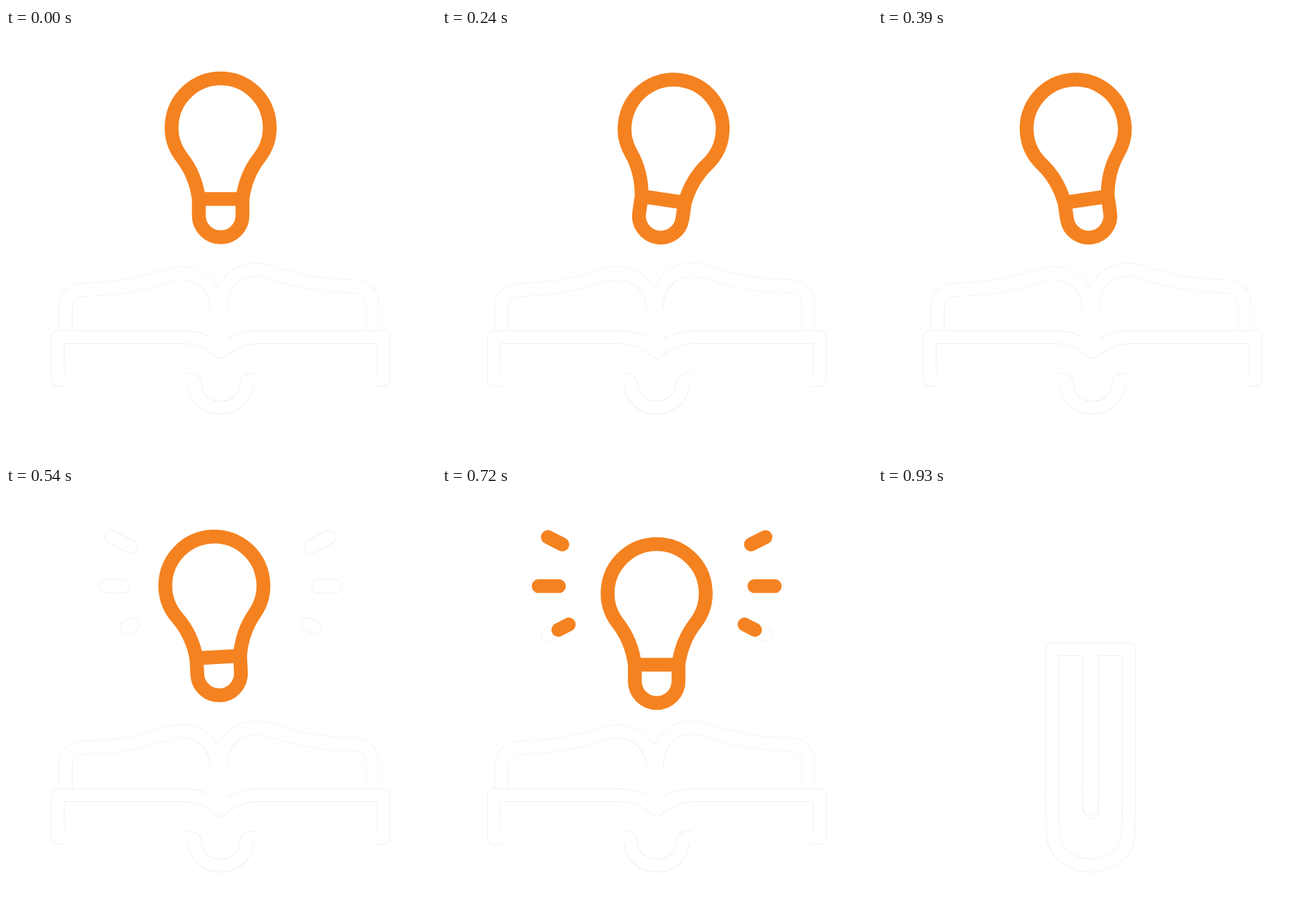
These frames come from a looping animation (640 by 640 pixels, 1200 ms). An HTML page with a canvas:

```html
<!DOCTYPE html>
<html lang="en">
<head>
<meta charset="utf-8">
<title>Idea book</title>
<style>
html, body { margin: 0; width: 100%; height: 100%; overflow: hidden; background: #fff; }
canvas { display: block; }
</style>
</head>
<body>
<canvas id="c" width="640" height="640"></canvas>
<script>
const ctx = document.getElementById('c').getContext('2d');
const ORANGE = '#f58220', EDGE = '#e2e2e2', WHITE = '#fff', MID = 319.5;
const LOOP = 1200, STEP = 30, CLOSED = 930;

const lin = (t, a, b) => Math.min(1, Math.max(0, (t - a) / (b - a)));
const ease = (t, a, b) => { const u = lin(t, a, b); return u * u * (3 - 2 * u); };
const mix = (a, b, u) => a + (b - a) * u;

function stroke(path, color, width) {
  ctx.strokeStyle = color;
  ctx.lineWidth = width;
  ctx.stroke(path);
}

const bulb = new Path2D(
  'M287 254.5C284 232 276 211 262 193A73 73 0 1 1 377 193' +
  'C363 211 355 232 352 254.5V279A32.5 32.5 0 0 1 287 279ZH352');

function drawBulb(t) {
  const swing = t < 210 ? ease(t, 0, 210)
    : t < 420 ? 1 - 2 * ease(t, 210, 420)
    : ease(t, 420, 615) - 1;
  const fall = 11.5 * (Math.max(0, t - 608) / 112) ** 3;
  ctx.save();
  ctx.translate(MID, 321 + fall);
  ctx.rotate(swing * 9.45 * Math.PI / 180);
  ctx.translate(-MID, -321);
  stroke(bulb, ORANGE, 20.6);
  ctx.restore();
}

// Three rays per side, top to bottom: each grows white, fills orange, then shrinks outwards
function drawRays(t) {
  for (let i = -1; i <= 1; i++) {
    const s = t - 45 * (i + 1);
    const pale = ease(s, 400, 540), head = ease(s, 560, 700), tail = lin(s, 695, 810);
    const tilt = 0.47 * i, length = 33 + 2 * i;
    for (const side of [-1, 1]) {
      const at = u => [
        MID + side * (178.5 - 16.5 * Math.abs(i) - length * (1 - u) * Math.cos(tilt)),
        149 + 73 * i - length * (1 - u) * Math.sin(tilt)
      ];
      const piece = (a, b) => {
        const p = new Path2D();
        p.moveTo(...at(a));
        p.lineTo(...at(b));
        return p;
      };
      if (pale > head) {
        stroke(piece(head, pale), EDGE, 20.6);
        stroke(piece(head, pale), WHITE, 19.6);
      }
      if (head > tail) stroke(piece(tail, head), ORANGE, 20.6);
    }
  }
}

// Both halves of the book use left-hand coordinates; the right one is mirrored.
// q runs from 0 to 1 as the pages sink into the closing cover.
function half(right, angle, q) {
  const cos = Math.cos(angle), sin = Math.sin(angle), bend = Math.sin(2 * angle);
  const place = (x, y) => [(right ? 2 * MID - x : x) - 3 * q, y];
  const turn = (x, y) => {
    const dx = x - 310, dy = y - 476;
    return place(310 + dx * cos - dy * sin - 7.5 * bend, 476 + dx * sin + dy * cos + 12 * bend);
  };
  const shift = right ? 5.5 : 0, lift = right ? 5 + 9 * bend : 3 * bend;
  const leaf = (x, y) => turn(x + shift, mix(y - lift, 469, q));
  const knot = (x0, y0, x1, y1) => place(mix(x0, x1, q), mix(y0, y1, q));

  const page = new Path2D();
  page.moveTo(...leaf(88.5, 460));
  page.lineTo(...leaf(88.5, 416));
  page.bezierCurveTo(...leaf(88.5, 398), ...leaf(102, 389.5), ...leaf(118, 389.5));
  page.bezierCurveTo(...leaf(165, 389), ...leaf(205, 380), ...leaf(236, 369.5));
  page.bezierCurveTo(...leaf(246, 366), ...leaf(253, 365), ...leaf(262, 365));
  page.bezierCurveTo(...leaf(292, 365), ...leaf(314, 388), ...leaf(314, 420));
  page.lineTo(...leaf(314, 460));

  const cover = new Path2D(), top = 460 + 9 * q;
  cover.moveTo(...place(MID, 482));
  cover.bezierCurveTo(...knot(303, 467, 316, 478), ...turn(285, top), ...turn(262, top));
  cover.lineTo(...turn(77, top));
  cover.lineTo(...turn(77, 523.5));
  cover.lineTo(...turn(271, 523.5));
  cover.quadraticCurveTo(...knot(280.5, 523.5, 262, 470), ...knot(281, 529, 263.5, 518));
  cover.bezierCurveTo(...knot(281, 550, 264, 545), ...knot(298, 565, 290, 565), ...place(MID, 565));

  // Straight runs whose edges do not show while the book lies open
  const quiet = new Path2D();
  quiet.moveTo(...turn(90, 523.5));
  quiet.lineTo(...turn(268, 523.5));
  quiet.moveTo(...leaf(314, 421));
  quiet.lineTo(...leaf(314, 472));

  return { page, cover, quiet };
}

function drawBook(t) {
  const turned = ease(t, 747, CLOSED);
  const q = ease(turned, 0.29, 1);
  const halves = [false, true].map(right => half(right, turned * Math.PI / 2, q));
  const each = (part, color, width) => halves.forEach(h => stroke(h[part], color, width));

  ctx.fillStyle = WHITE;
  for (const { page, cover } of halves) {
    ctx.fill(cover);
    ctx.fill(page);
    stroke(page, EDGE, 20);
    stroke(page, WHITE, 19);
  }
  if (!turned) each('page', WHITE, 19);
  each('cover', EDGE, 20);
  each('cover', WHITE, 19);
  if (!turned) {
    ctx.lineCap = 'butt';
    each('quiet', WHITE, 22);
    ctx.lineCap = 'round';
  }
}

function frame() {
  const now = (performance.now() - start) % LOOP;
  const t = Math.min(CLOSED, Math.floor(now / STEP) * STEP);
  ctx.fillStyle = WHITE;
  ctx.fillRect(0, 0, 640, 640);
  if (t < CLOSED) {
    drawBulb(t);
    drawRays(t);
  }
  drawBook(t);
  requestAnimationFrame(frame);
}

ctx.lineCap = ctx.lineJoin = 'round';
const start = performance.now();
frame();
</script>
</body>
</html>
```
